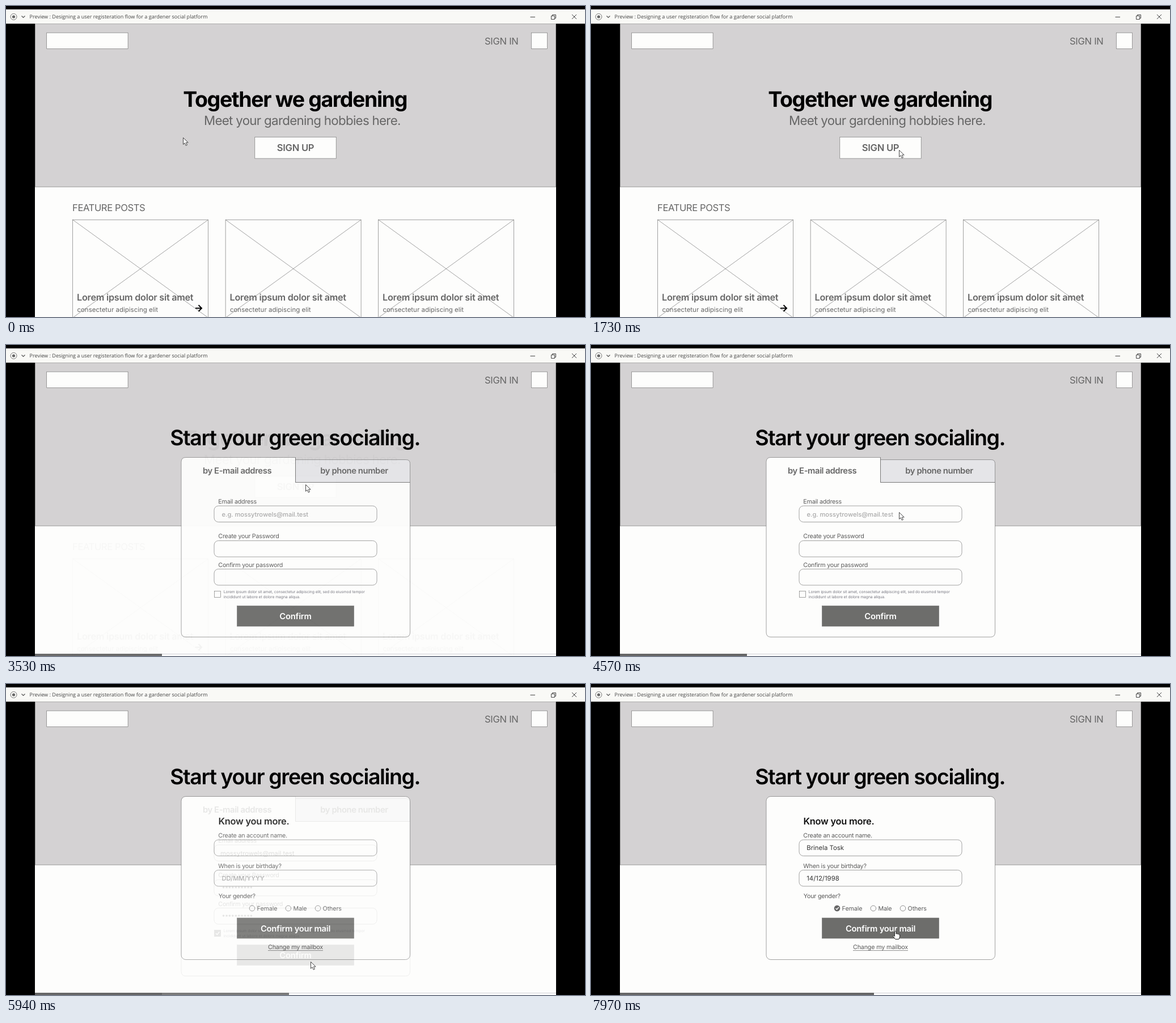
Write an HTML page that moves like this. It is 1021 px wide and 549 px high and loops after 8000 ms.

```html
<!DOCTYPE html>
<html lang="en">
<head>
<meta charset="utf-8">
<title>Sign-up flow preview</title>
<style>
  html, body { margin: 0; width: 100%; height: 100%; overflow: hidden; background: #000; }
  svg { display: block; width: 1021px; height: 549px; }
  text { font-family: Inter, "Noto Sans", sans-serif; font-optical-sizing: none; text-rendering: geometricPrecision; white-space: pre; }
</style>
</head>
<body>
<svg id="stage" viewBox="0 0 1021 549"></svg>
<script>
const LOOP = 8000, FADE = 300;
const FORM_AT = 3290, PROFILE_AT = 5755;
const GRAY = '#666', LINE = '#707070', WHITE = '#fdfdfc', HERO = '#d4d2d3', DARK = '#6d6d6b';

// Drawing helpers, each returning SVG markup
const text = (x, y, size, str, { ls = 0, w = 400, fill = GRAY, mid = false } = {}) =>
  `<text x="${x}" y="${y}" font-size="${size}" font-weight="${w}" letter-spacing="${ls}" fill="${fill}"` +
  `${mid ? ' text-anchor="middle"' : ''}>${str}</text>`;
const rect = (x, y, w, h, { fill = WHITE, stroke = LINE, r = 0 } = {}) =>
  `<rect x="${x}" y="${y}" width="${w}" height="${h}" rx="${r}" fill="${fill}" stroke="${stroke}" stroke-width=".65"/>`;
const path = (d, { stroke = LINE, w = 0.65, fill = 'none' } = {}) =>
  `<path d="${d}" fill="${fill}" stroke="${stroke}" stroke-width="${w}"/>`;
const during = (from, to, body) => `<g data-from="${from}" data-to="${to}">${body}</g>`;

const label = (x, y, str) => text(x, y, 10.7, str, { ls: -0.22, fill: '#5a5a5a' });
const field = y => rect(367, y, 287, 28.5, { r: 7.5 });
const entry = (x, y, str) => text(x, y, 11.4, str, { fill: '#333' });
const hint = (y, str) => text(380.5, y, 11.1, str, { w: 500, fill: '#a9a9a9' });
const heading = (y, str, w) => text(509.7, y, 37.5, str, { ls: -1.37, w, fill: '#000', mid: true });
const button = (y, str) => rect(407.5, y, 206, 36, { fill: DARK }) +
  text(510.5, y + 23.6, 14.8, str, { ls: -0.25, w: 600, fill: '#fff', mid: true });
const radio = (x, str) => `<circle cx="${x}" cy="396" r="4.8" fill="${WHITE}" stroke="#777" stroke-width=".8"/>` +
  text(x + 8.6, 400, 10.7, str, { ls: -0.1, fill: '#5a5a5a' });
const progress = end => path('M51 545.5H970', { stroke: '#cfcfd6', w: 1 }) +
  rect(51, 545, end - 51, 4, { fill: GRAY, stroke: 'none' });

const page = rect(51, 31, 919, 518, { stroke: 'none' }) +
  rect(51.3, 31.5, 918.4, 287.7, { fill: HERO }) +
  rect(71.7, 47.2, 143.4, 28.2) + rect(926.3, 47.2, 28.2, 28.2) +
  text(844, 68, 16.6, 'SIGN IN', { ls: -0.3 });

function postCard(x) {
  return rect(x, 377.3, 239, 173, { fill: 'none' }) +
    path(`M${x} 377.3l239 173M${x + 239} 377.3l-239 173`) +
    text(x + 7.5, 519.5, 16.2, 'Lorem ipsum dolor sit amet', { ls: -0.25, w: 600 }) +
    text(x + 7.8, 540, 11.5, 'consectetur adipiscing elit');
}

const home = page + heading(178, 'Together we gardening', 700) +
  text(349, 209.5, 22.3, 'Meet your gardening hobbies here.', { ls: -0.69 }) +
  rect(438.8, 231.3, 143.4, 37.8) +
  text(510.5, 256.4, 16.6, 'SIGN UP', { ls: -0.3, w: 600, mid: true }) +
  text(117, 362.3, 16.6, 'FEATURE POSTS', { ls: -0.4 }) +
  [117.6, 387.1, 656.6].map(postCard).join('') +
  path('M334 533.5H345M339.5 528L345 533.5L339.5 539', { stroke: '#000', w: 2 }) +
  during(2800, FORM_AT + FADE, rect(966.5, 44, 2.5, 182, { fill: '#626262', stroke: 'none' }));

const stars = y => text(381, y, 9.5, '*'.repeat(10), { ls: 0.3, w: 600, fill: '#333' });
const tabText = (x, str) => text(x, 227.2, 14.8, str, { ls: -0.4, w: 600, mid: true });
const small = (y, str) => text(383.8, y, 6.8, str, { ls: -0.08, fill: '#777780' });
const form = page + heading(176.5, 'Start your green socialing.', 600) +
  path('M510.5 242.5V198.5H317Q309 198.5 309 206.5V507Q309 515.5 317 515.5H704.5Q712.5 515.5 712.5 507V242.5Z', { fill: WHITE }) +
  path('M510.5 202.5H705.5Q712.5 202.5 712.5 209.5V242.5H510.5Z', { fill: '#e5e5e8' }) +
  path('M510.5 198.5V242.5H712.5', { stroke: '#777', w: 1 }) +
  tabText(407.5, 'by E-mail address') + tabText(614, 'by phone number') +
  label(374.3, 279.8, 'Email address') + field(284) +
  during(0, 4720, hint(303, 'e.g. mossytrowels@mail.test')) +
  during(4720, LOOP, entry(378, 303, 'mossytrowels@mail.test')) +
  label(374.3, 341.3, 'Create your Password') + field(345.5) +
  during(4960, LOOP, stars(363.5)) +
  label(374.3, 391.6, 'Confirm your password') + field(395.5) +
  during(5160, LOOP, stars(413.5)) +
  rect(367.5, 434.5, 11, 11) +
  during(5420, LOOP, rect(367.5, 434.5, 11, 11, { fill: GRAY, stroke: GRAY }) +
    path('M370 440l2.3 2.5l4-5', { stroke: '#fff', w: 1.4 })) +
  small(438.2, 'Lorem ipsum dolor sit amet, consectetur adipiscing elit, sed do eiusmod tempor') +
  small(447.2, 'incididunt ut labore et dolore magna aliqua.') +
  button(460.5, 'Confirm') + progress(275);

const profile = page + heading(176.5, 'Start your green socialing.', 600) +
  rect(309, 198.5, 403.5, 288, { r: 8 }) +
  text(374.5, 247.8, 16.4, 'Know you more.', { ls: -0.25, w: 600, fill: '#111' }) +
  label(374.3, 270.8, 'Create an account name.') + field(275) +
  during(6400, LOOP, entry(380.2, 293, 'Brinela Tosk')) +
  label(374.3, 324.6, 'When is your birthday?') + field(328.5) +
  during(0, 6720, hint(347, 'DD/MM/YYYY')) +
  during(6720, LOOP, entry(380.2, 346.5, '14/12/1998')) +
  label(374.8, 378.4, 'Your gender?') +
  radio(434, 'Female') + radio(497.8, 'Male') + radio(550, 'Others') +
  during(7110, LOOP, `<circle cx="434" cy="396" r="5.2" fill="${GRAY}"/>` +
    path('M431.5 396l2 2l3.3-4', { stroke: '#fff', w: 1.3 })) +
  button(413, 'Confirm your mail') +
  text(510.5, 468, 10.7, 'Change my mailbox', { ls: -0.15, fill: '#5a5a5a', mid: true }) +
  path('M462 470.5H559', { stroke: '#777', w: 0.8 }) + progress(499);

const chrome = rect(0, 6, 1021, 25.2, { fill: '#f9f9f6', stroke: 'none' }) +
  `<circle cx="13.5" cy="19" r="5.5" fill="none" stroke="#777"/><circle cx="13.5" cy="19" r="2.6" fill="#666"/>` +
  path('M27.5 17.5l3 3l3-3', { stroke: '#555', w: 1.2 }) +
  `<text x="41.5" y="22.4" font-size="9.07" fill="#444" style="font-family:'Open Sans',sans-serif">` +
  'Preview : Designing a user registeration flow for a gardener social platform</text>' +
  path('M924.5 19.5H933M961.5 17.5h6v6h-6ZM963.5 17v-1.5h6v6H968M998 15l8 8M1006 15l-8 8', { stroke: '#444', w: 1 });

const arrow = path('M.5 .5V12.3L3.2 9.8L5.2 14.3L7.4 13.3L5.4 9H9.2Z', { stroke: '#333', w: 0.9, fill: '#fff' });
const hand = path('M-1.5 7.5V1Q-.2 -1 1 1V5Q2.3 4 3.3 5.4Q4.6 4.5 5.5 5.9Q7.3 5.2 7.5 7V10.5L5.8 14.5H-.3L-4.4 9.3Q-4 7.3 -1.5 9.4Z',
  { stroke: '#222', w: 1, fill: '#fff' });

const stage = document.getElementById('stage');
stage.innerHTML = `<g>${home}</g><g id="form">${form}</g><g id="profile">${profile}</g>${chrome}` +
  `<g id="cursor"><g id="arrow">${arrow}</g><g id="hand">${hand}</g></g>`;
const part = id => document.getElementById(id);
const timed = [...stage.querySelectorAll('[data-from]')];

// Pointer stops: time, x, y
const stops = [
  [450, 312, 232], [1680, 543, 254], [1800, 543, 254], [2050, 536, 247],
  [3350, 536, 247], [3500, 528, 246], [3900, 528, 246], [4400, 543, 295],
  [4720, 543, 295], [4900, 541, 359], [4980, 541, 359], [5100, 539, 409],
  [5180, 539, 409], [5360, 373, 440], [5440, 373, 440], [5680, 537, 490],
  [6030, 537, 490], [6320, 542, 289], [6420, 542, 289], [6620, 540, 343],
  [6740, 540, 343], [7030, 434, 396], [7150, 434, 396], [7500, 537, 436]
];
const clamp = v => Math.max(0, Math.min(1, v));

function pointer(t) {
  const i = stops.findIndex(s => s[0] > t);
  if (i === 0) return stops[0].slice(1);
  if (i < 0) return stops[stops.length - 1].slice(1);
  const [a, x0, y0] = stops[i - 1], [b, x1, y1] = stops[i];
  const k = (t - a) / (b - a), e = k * k * (3 - 2 * k);
  return [x0 + (x1 - x0) * e, y0 + (y1 - y0) * e];
}

const fade = (t, start) => 1 - (1 - clamp((t - start) / FADE)) ** 2;
const show = (el, on) => el.setAttribute('display', on ? 'inline' : 'none');

function draw(now) {
  const t = now % LOOP;
  part('form').setAttribute('opacity', fade(t, FORM_AT));
  part('profile').setAttribute('opacity', fade(t, PROFILE_AT));
  for (const el of timed) show(el, t >= +el.dataset.from && t < +el.dataset.to);

  const [x, y] = pointer(t);
  const overButton = (t > 1900 && t < 3400) || (t > 5620 && t < 5850) || t > 7420;
  part('cursor').setAttribute('transform', `translate(${x} ${y})`);
  show(part('arrow'), !overButton);
  show(part('hand'), overButton);
  requestAnimationFrame(draw);
}
draw(0);
</script>
</body>
</html>
```
